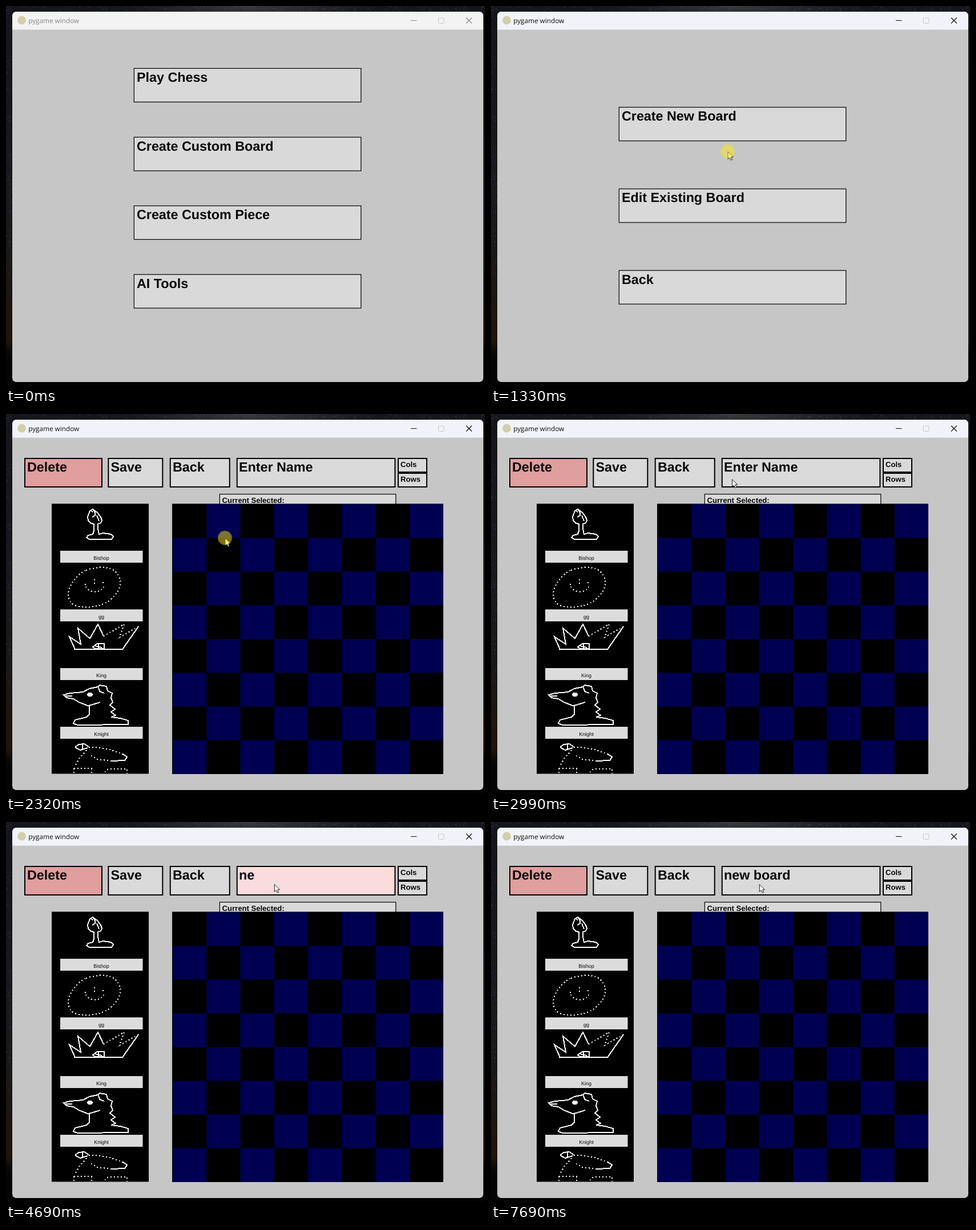
An HTML page for the animation above (8000 ms loop, 839 by 667 pixels).

```html
<!DOCTYPE html>
<html lang="en">
<head>
<meta charset="utf-8">
<title>Custom chess board editor</title>
<style>
  html, body { margin: 0; width: 100%; height: 100%; overflow: hidden; background: #08090b; }
  svg { display: block; width: 839px; height: 667px; }

  text { font: 700 23.3px "Liberation Sans", sans-serif; fill: #080808; text-rendering: geometricPrecision; }
  .small text { font-size: 13.1px; }
  .label text { font-size: 9px; font-weight: 400; text-anchor: middle; }
  .label rect { fill: #dcdcdc; }
  .bar text { font: 400 11.75px "Open Sans", sans-serif; fill: currentColor; }
  .thin rect { fill: #d9d9d9; stroke: #000; stroke-width: 1.2; }
  .thick rect { fill: #dadada; stroke: #000; stroke-width: 2; }
  .thick .delete { fill: #e09e9e; }
  .pieces { fill: none; stroke: #fff; stroke-width: 2; shape-rendering: crispEdges; }
  .dots { stroke-dasharray: 2 4; }

  /* One loop; every change is a hard cut. */
  .anim { animation: 8s step-end infinite; }
  .bar { animation-name: focus; }
  .bar-bg { animation-name: focus-bg; }
  .main { animation-name: main; }
  .boards { animation-name: boards; }
  .editor { animation-name: editor; }
  .name { animation-name: name-field; }
  .hint { animation-name: hint; }
  .k1 { animation-name: key1; }
  .k2 { animation-name: key2; }
  .k3 { animation-name: key3; }
  .k4 { animation-name: key4; }
  .k5 { animation-name: key5; }
  .cursor { animation-name: move; }
  .click { animation-name: click; }

  @keyframes focus { 0% { color: #858585 } 12.5%, 100% { color: #0c0c0c } }
  @keyframes focus-bg { 0% { fill: #f3f3f3 } 12.5%, 100% { fill: #f2f3fa } }
  @keyframes main { 0% { opacity: 1 } 16.625%, 100% { opacity: 0 } }
  @keyframes boards { 0% { opacity: 0 } 16.625% { opacity: 1 } 29%, 100% { opacity: 0 } }
  @keyframes editor { 0% { opacity: 0 } 29%, 100% { opacity: 1 } }
  @keyframes name-field { 0% { fill: #dadada } 41.875% { fill: #fbdcdc } 96.125%, 100% { fill: #dadada } }
  @keyframes hint { 0% { opacity: 1 } 54.375%, 100% { opacity: 0 } }
  @keyframes key1 { 0% { visibility: hidden } 54.375%, 100% { visibility: visible } }
  @keyframes key2 { 0% { visibility: hidden } 58.625%, 100% { visibility: visible } }
  @keyframes key3 { 0% { visibility: hidden } 71.125%, 100% { visibility: visible } }
  @keyframes key4 { 0% { visibility: hidden } 79.5%, 100% { visibility: visible } }
  @keyframes key5 { 0% { visibility: hidden } 83.625%, 100% { visibility: visible } }
  @keyframes click {
    0% { opacity: 0 }
    16.625% { opacity: .5 } 20.75% { opacity: 0 }
    29% { opacity: .5 } 33.125% { opacity: 0 }
    41.875% { opacity: .5 } 46.125%, 100% { opacity: 0 }
  }
  @keyframes move {
    0% { transform: translate(464px, 320px); opacity: 0 }
    4.125% { transform: translate(464px, 320px); opacity: 1 }
    8.375% { transform: translate(459px, 282px); opacity: 1 }
    16.625% { transform: translate(414.5px, 255px); opacity: 1 }
    20.75% { transform: translate(409px, 260px); opacity: 1 }
    24.875% { transform: translate(345px, 330px); opacity: 1 }
    29% { transform: translate(383.5px, 217.5px); opacity: 1 }
    33.125% { transform: translate(334px, 194px); opacity: 1 }
    37.375% { transform: translate(422px, 114px); opacity: 1 }
    41.875%, 100% { transform: translate(469.7px, 108.7px); opacity: 1 }
  }
</style>
</head>
<body>
<svg viewBox="0 0 839 667" xmlns="http://www.w3.org/2000/svg">
  <defs>
    <linearGradient id="sky" x2="0" y2="1">
      <stop offset="0" stop-color="#14161c"/>
      <stop offset=".55" stop-color="#18191c"/>
      <stop offset=".75" stop-color="#1d1611"/>
      <stop offset=".88" stop-color="#20150c"/>
      <stop offset=".92" stop-color="#050505"/>
      <stop offset="1" stop-color="#040404"/>
    </linearGradient>
    <radialGradient id="haze">
      <stop offset="0" stop-color="#58575a" stop-opacity=".5"/>
      <stop offset="1" stop-color="#58575a" stop-opacity="0"/>
    </radialGradient>
    <pattern id="checks" x="292" y="158.2" width="118.5" height="118.4" patternUnits="userSpaceOnUse">
      <path d="M0 0H118.5V118.4H0Z"/>
      <path d="M59.25 0H118.5V59.2H0V118.4H59.25Z" fill="#000052"/>
    </pattern>
    <clipPath id="list"><path d="M80 158H250V631.5H80Z"/></clipPath>
    <clipPath id="window"><rect x="11" y="10" width="825" height="650" rx="7"/></clipPath>
  </defs>

  <rect width="839" height="667" fill="url(#sky)"/>
  <ellipse cx="430" cy="0" rx="220" ry="40" fill="url(#haze)"/>
  <path id="stars" stroke="#a9adb8" stroke-opacity=".3"/>

  <g clip-path="url(#window)">
    <path d="M11 10H836V660H11Z" fill="#c6c6c6"/>
    <path class="anim bar-bg" d="M11 10H836V41.5H11Z"/>
  </g>
  <g class="anim bar">
    <circle cx="27.5" cy="25" r="7.5" fill="#d3cfaa"/>
    <text x="39.2" y="29.5">pygame window</text>
    <path d="M709 25.5H719.5M806 20.5L816 30.5M816 20.5L806 30.5" stroke="currentColor" stroke-width="1.1"/>
    <rect x="757.5" y="21" width="9.5" height="9.5" rx="1" fill="none" stroke="#c6c8cc"/>
  </g>

  <g class="anim main thin">
    <rect x="224.3" y="109.5" width="397.5" height="59"/><text x="229" y="133">Play Chess</text>
    <rect x="224.3" y="230.3" width="397.5" height="59"/><text x="229" y="253.5">Create Custom Board</text>
    <rect x="224.3" y="350.7" width="397.5" height="59"/><text x="229" y="374.3">Create Custom Piece</text>
    <rect x="224.3" y="471.3" width="397.5" height="59"/><text x="229" y="495">AI Tools</text>
  </g>

  <g class="anim boards thin">
    <rect x="224.3" y="177.7" width="397.5" height="59"/><text x="229" y="201.2">Create New Board</text>
    <rect x="224.3" y="321" width="397.5" height="59"/><text x="229" y="344.4">Edit Existing Board</text>
    <rect x="224.3" y="464.2" width="397.5" height="59"/><text x="229" y="487.7">Back</text>
  </g>

  <g class="anim editor">
    <g class="thick">
      <rect class="delete" x="33" y="78" width="135" height="50"/><text x="37" y="101.3">Delete</text>
      <rect x="179.3" y="78" width="95" height="50"/><text x="183.5" y="101.3">Save</text>
      <rect x="287.7" y="78" width="104" height="50"/><text x="292" y="101.3">Back</text>
      <rect class="anim name" x="404.7" y="78" width="276.7" height="50"/>
      <text class="anim hint" x="408" y="101.3">Enter Name</text>
      <text x="408" y="101.3"><tspan class="anim k1">n</tspan><tspan class="anim k2">e</tspan><tspan class="anim k3">w</tspan><tspan class="anim k4"> boa</tspan><tspan class="anim k5">rd</tspan></text>
    </g>
    <g class="thick small">
      <rect x="687" y="78" width="50" height="24"/><text x="691" y="93">Cols</text>
      <rect x="687" y="104" width="50" height="24"/><text x="691" y="119">Rows</text>
    </g>
    <g class="thin small">
      <rect x="374.3" y="140.7" width="308.5" height="20"/><text x="378.5" y="156">Current Selected:</text>
    </g>
    <path d="M291 157.5H766V632H291ZM80 157.5H250V631.5H80Z"/>
    <rect x="292" y="158.2" width="473.7" height="473.6" fill="url(#checks)"/>

    <g class="pieces" clip-path="url(#list)">
      <!-- bishop -->
      <path d="M152 167L147 170L143 180L144 187L149 192L154 193V205L152 211L144 213L141 217L146 220H185L188 215L184 211L170 209L163 211L161 202V193L166 191L168 187L166 181L160 173L152 167L156 173V178L151 181M148 169L152 172M159 178L163 188"/>
      <!-- face -->
      <path class="dots" d="M140 274C160 268 184 266 194 279C208 298 196 316 180 328C164 339 144 341 124 337C108 333 106 314 113 302C118 291 128 280 140 274"/>
      <path class="dots" d="M138 299h2M169 296h2M155 290V302M140 303Q145 312 156 312Q168 311 171 303"/>
      <!-- crown -->
      <path d="M121 413L111 391L131 404L126 376L147 394L161 369L171 390M232 373L204 413H119"/>
      <path class="dots" d="M171 390L207 369L199 392L232 373" stroke-dasharray="4 3"/>
      <path d="M152 409L160 403H172V412H156ZM156 407L168 410M162 404V411"/>
      <!-- knight -->
      <path d="M101 493L112 490L135 488L146 482L161 479L164 476L176 478L178 486L186 490L184 498L187 506L182 511L191 518L184 523L192 529L184 532L200 534L214 538V545L125 546L118 543L121 537L141 532L146 527V513L128 506L118 500L106 498ZM102 495H116M145 512L165 506M162 480L164 487L172 490"/>
      <ellipse cx="147" cy="492.5" rx="4" ry="2.5" fill="#fff"/>
      <!-- next piece, cut off by the list -->
      <path d="M121 585L127 580L137 579L145 584M121 585L130 590L143 586M134 580V588M185 609L208 608L212 602L205 597"/>
      <path class="dots" stroke-dasharray="4 2" d="M145 585H160L185 590L205 597M185 609L160 606L149 600M141 590L128 605L121 617M119 622H153M119 622V631M150 622V631M173 629L179 623H212V631"/>
    </g>

    <g class="label">
      <rect x="95" y="240" width="144.5" height="21"/><text x="167" y="255.5">Bishop</text>
      <rect x="95" y="343" width="144.5" height="21"/><text x="167" y="358.5">gg</text>
      <rect x="95" y="446" width="144.5" height="21"/><text x="167" y="461.5">King</text>
      <rect x="95" y="549" width="144.5" height="21"/><text x="167" y="564.5">Knight</text>
    </g>
  </g>

  <g class="anim cursor">
    <path d="M.5 .8V13.6L3.5 10.9L5.7 15.6L7.9 14.6L5.8 10H9.7Z" fill="#fff" stroke="#000" stroke-width=".9"/>
    <circle class="anim click" r="12.4" fill="#fbe816"/>
  </g>
</svg>
<script>
  // Faint stars along the visible rim of the desktop.
  let seed = 7;
  const rand = n => (seed = seed * 16807 % 2147483647) / 2147483647 * n;
  const dot = (x, y) => `M${x.toFixed(1)} ${y.toFixed(1)}h1`;
  let d = "";
  for (let i = 0; i < 260; i++) d += dot(rand(839), rand(9));
  for (let i = 0; i < 130; i++) d += dot(rand(10), rand(480));
  document.getElementById("stars").setAttribute("d", d);
</script>
</body>
</html>
```
